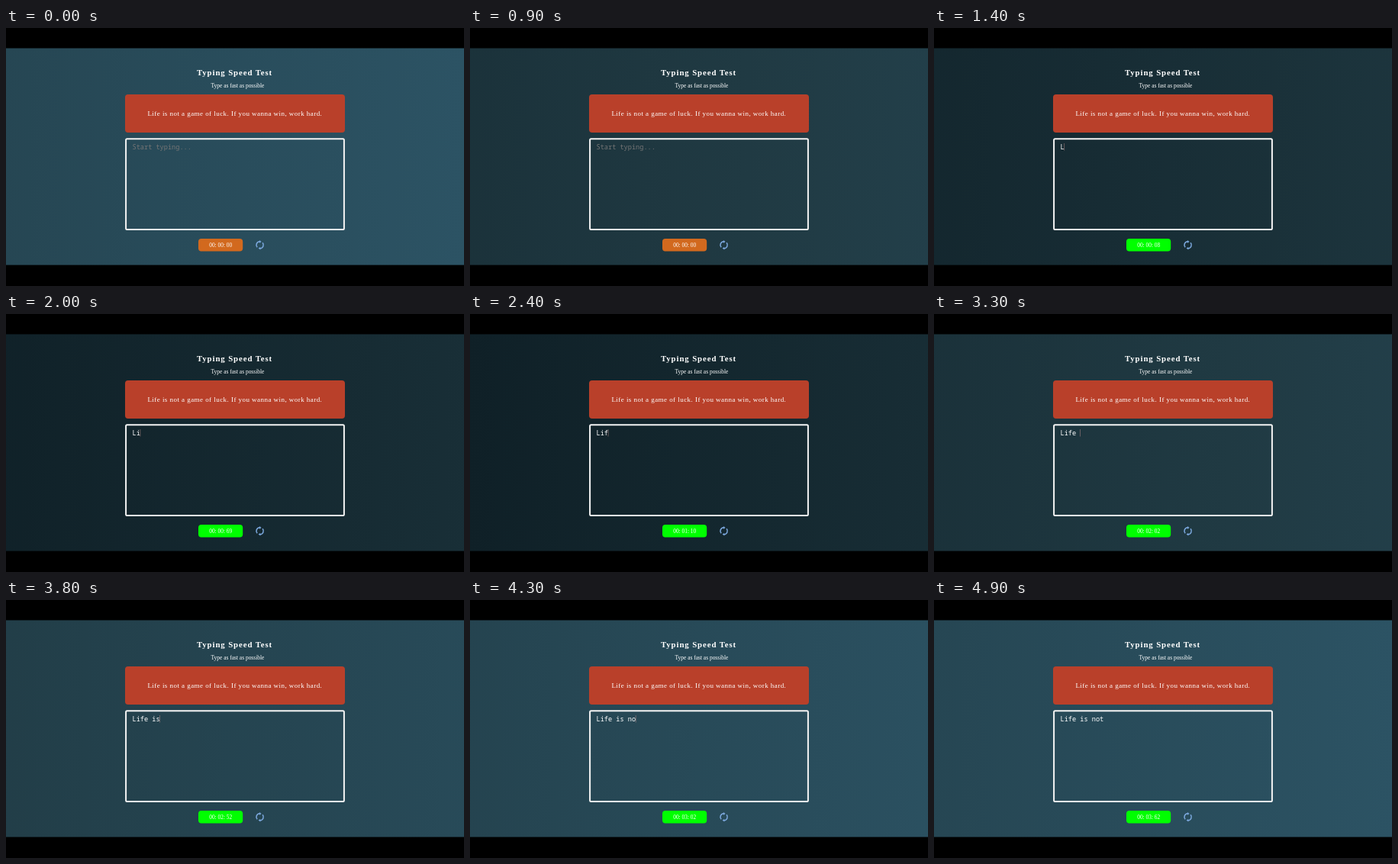
Write an HTML page that moves like this. It is 600 px wide and 338 px high and loops after 5 s.

```html
<!DOCTYPE html>
<html lang="en">
<head>
<meta charset="utf-8">
<title>Typing Speed Test</title>
<style>
  html, body { margin: 0; width: 100%; height: 100%; overflow: hidden; background: #000; }
  svg { display: block; width: 100vw; height: 100vh; }
  text { font-family: "Liberation Serif", "Times New Roman", serif; fill: #fff; white-space: pre; }
  .mono { font: 8.6px "Noto Sans Mono", "DejaVu Sans Mono", monospace; }
</style>
</head>
<body>
<svg viewBox="0 0 600 338">
  <defs>
    <linearGradient id="sky" gradientUnits="userSpaceOnUse" x1="0" x2="2400" y1="0" y2="0">
      <stop offset="0" stop-color="#0f2027"/>
      <stop offset=".5" stop-color="#203a43"/>
      <stop offset="1" stop-color="#2c5364"/>
    </linearGradient>
    <g id="arrow">
      <path d="M-3.5 3A4.6 4.6 0 0 1-.4-4.6" fill="none" stroke="#7ba7dc" stroke-width="1.6"/>
      <path d="M-.6-6.3L2-4.3L-.6-2.6Z" fill="#7ba7dc"/>
    </g>
  </defs>
  <rect y="26.5" width="600" height="284" fill="url(#sky)"/>

  <text x="250" y="62" font-size="10.8" font-weight="bold" letter-spacing=".9">Typing Speed Test</text>
  <text x="268.6" y="78" font-size="7.45">Type as fast as possible</text>

  <rect x="156" y="87" width="288" height="50" rx="4" fill="#b9402a"/>
  <text x="185.4" y="115" font-size="9" letter-spacing=".45">Life is not a game of luck. If you wanna win, work hard.</text>

  <rect x="157.1" y="145.2" width="285.8" height="118.7" rx="1.5" fill="none" stroke="#f4f4f4" stroke-width="2"/>
  <text id="entry" class="mono" x="165.5" y="158.7"></text>
  <rect id="caret" y="151" width=".7" height="9.5" fill="#d49a94" opacity=".6"/>

  <rect id="button" x="252" y="276" width="58.2" height="16.6" rx="4"/>
  <text id="timer" x="281.2" y="287" font-size="7.4" text-anchor="middle"></text>
  <g transform="translate(332.6 284.3)">
    <use href="#arrow"/>
    <use href="#arrow" transform="rotate(180)"/>
  </g>
</svg>
<script>
const LOOP = 5000, STEP = 100, START = 1300, PITCH = 5.16;
const phrase = "Life is not";
const keys = [1300, 1700, 2150, 2550, 3050, 3350, 3600, 3900, 4050, 4200, 4350];
const $ = id => document.getElementById(id);
const [sky, entry, caret, button, timer] = ["sky", "entry", "caret", "button", "timer"].map($);

// CSS "ease": cubic-bezier(.25, .1, .25, 1)
function ease(x) {
  const curve = (s, a, b) => 3 * (1 - s) ** 2 * s * a + 3 * (1 - s) * s * s * b + s ** 3;
  let lo = 0, hi = 1;
  for (let i = 0; i < 25; i++) {
    const mid = (lo + hi) / 2;
    if (curve(mid, .25, .25) < x) lo = mid; else hi = mid;
  }
  return curve(lo, .1, 1);
}

function drawSky(t) {
  const phase = (t - 125 + LOOP) % LOOP / (LOOP / 2);
  const pos = phase < 1 ? 1 - ease(phase) : ease(phase - 1);
  sky.setAttribute("gradientTransform", `translate(${-1800 * pos} 0)`);
}

function drawEntry(t) {
  const count = keys.filter(k => k <= t).length;
  entry.textContent = count ? phrase.slice(0, count) : "Start typing...";
  entry.style.fill = count ? "#fff" : "#757575";
  const lit = count && (t - keys[count - 1]) % 1000 < 500;
  caret.style.display = lit ? "" : "none";
  caret.setAttribute("x", 165.2 + count * PITCH);
}

function drawTimer(t) {
  const lag = Math.max(0, 3300 - t) * .0023;
  const cs = t < START ? 0 : Math.max(0, Math.round((t - 1280) / 10 - lag));
  const pad = n => String(n).padStart(2, "0");
  timer.textContent = `00: ${pad(Math.floor(cs / 100))}: ${pad(cs % 100)}`;
  button.setAttribute("fill", t < START ? "#d2691e" : "#00ff00");
}

const begin = performance.now();
function frame() {
  const t = Math.floor((performance.now() - begin) % LOOP / STEP) * STEP;
  drawSky(t);
  drawEntry(t);
  drawTimer(t);
  requestAnimationFrame(frame);
}
frame();
</script>
</body>
</html>
```
